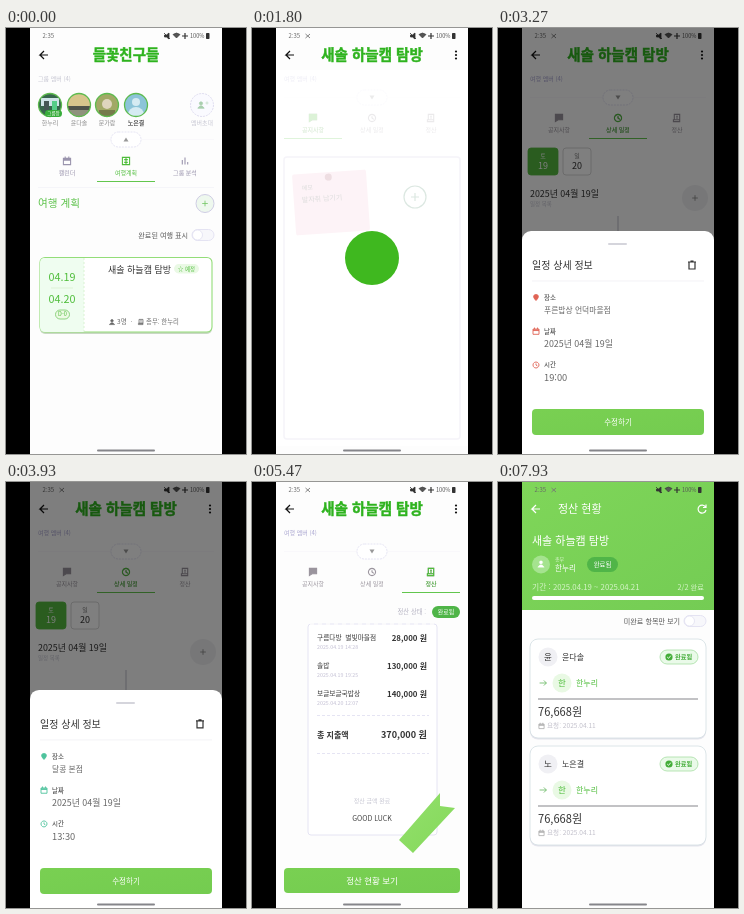
Write an HTML page that moves like this. It is 240x426 px and loops after 8 s.

```html
<!DOCTYPE html>
<html lang="ko">
<head>
<meta charset="utf-8">
<title>여행 앱</title>
<style>
html, body { margin: 0; width: 100%; height: 100%; overflow: hidden; background: #000; }
svg { display: block; width: 100vw; height: 100vh; }
text { font-family: "Noto Sans CJK KR", "Noto Sans CJK", "Noto Sans", sans-serif; white-space: pre; }
.a { animation: 8s linear infinite; }
.trip { animation-name: trip; }
.status { animation-name: status; }
.loading { animation-name: loading; }
.views { animation-name: views; }
.line { animation-name: line; }
.on0 { animation-name: on0; }
.on1 { animation-name: on1; }
.on2 { animation-name: on2; }
.dim { animation-name: dim; }
.dinner { animation-name: dinner; }
.lunch { animation-name: lunch; }
.refresh { animation-name: refresh; transform-origin: 120px 68px; }
.spin { animation: spin .9s linear infinite; transform-origin: 120px 68px; }
@keyframes trip { 0%, 12% { opacity: 0 } 15%, 100% { opacity: 1 } }
@keyframes status {
  0%, 74% { opacity: 0; transform: translateX(24px); animation-timing-function: ease-out }
  77.5%, 100% { opacity: 1; transform: none }
}
@keyframes loading { 0%, 25% { opacity: 1 } 27.5%, 100% { opacity: 0 } }
@keyframes views {
  0%, 30.5% { transform: none; animation-timing-function: ease }
  34%, 59.5% { transform: translateX(-192px); animation-timing-function: ease }
  63%, 100% { transform: translateX(-384px) }
}
@keyframes line {
  0%, 30.5% { transform: none; animation-timing-function: ease }
  34%, 59.5% { transform: translateX(59px); animation-timing-function: ease }
  63%, 100% { transform: translateX(118px) }
}
@keyframes on0 { 0%, 30.5% { opacity: 1 } 34%, 100% { opacity: 0 } }
@keyframes on1 { 0%, 30.5% { opacity: 0 } 34%, 59.5% { opacity: 1 } 63%, 100% { opacity: 0 } }
@keyframes on2 { 0%, 59.5% { opacity: 0 } 63%, 100% { opacity: 1 } }
@keyframes dim {
  0%, 35% { opacity: 0 } 38%, 42% { opacity: .5 }
  44.5%, 46% { opacity: 0 } 48.5%, 53.5% { opacity: .5 } 56%, 100% { opacity: 0 }
}
@keyframes dinner {
  0%, 35% { transform: translateY(226px); animation-timing-function: ease-out }
  38.5%, 42% { transform: none; animation-timing-function: ease-in }
  44.5%, 100% { transform: translateY(226px) }
}
@keyframes lunch {
  0%, 46% { transform: translateY(226px); animation-timing-function: ease-out }
  49.125% { transform: translateY(5px) }
  50%, 53.5% { transform: none; animation-timing-function: ease-in }
  56%, 100% { transform: translateY(226px) }
}
@keyframes refresh {
  0%, 80% { transform: translateY(-80px) } 83%, 88.5% { transform: none }
  90.5%, 100% { transform: scale(0) }
}
@keyframes spin { to { transform: rotate(360deg) } }
</style>
</head>
<body>
<svg id="stage" viewBox="0 0 240 426" preserveAspectRatio="none"></svg>
<script>
const GREEN = '#4fbd3b', TITLE = '#2fb31f', INK = '#333', PALE = '#c6c6d2', EDGE = '#dfddf0';
const TRIP = '새솔 하늘캠 탐방', LEADER = '한누리';
const MEMBERS = [LEADER, '윤다솔', '문가람', '노은결'];

const attrs = o => Object.entries(o).map(([k, v]) => `${k}="${v}"`).join(' ');
const group = (cls, ...kids) => `<g class="a ${cls}">${kids.join('')}</g>`;
const rect = (x, y, w, h, fill, r = 0, more = {}) =>
  `<rect ${attrs({ x, y, width: w, height: h, fill, rx: r, ...more })}/>`;
const box = (x, y, w, h, fill, r, stroke, more = {}) =>
  rect(x, y, w, h, fill, r, { stroke, 'stroke-width': .8, ...more });
const dot = (cx, cy, r, fill, more = {}) => `<circle ${attrs({ cx, cy, r, fill, ...more })}/>`;
const path = (d, stroke, width = 1, more = {}) =>
  `<path ${attrs({ d, stroke, 'stroke-width': width, fill: 'none', ...more })}/>`;
// y is the vertical middle of the line of text
const text = (x, y, size, fill, str, anchor = 'start', weight = 400, more = {}) =>
  `<text ${attrs({ x, y: y + size * .36, fill, 'font-size': size, 'text-anchor': anchor, 'font-weight': weight, ...more })}>${str}</text>`;
const mid = (x, y, size, fill, str, weight) => text(x, y, size, fill, str, 'middle', weight);
const end = (x, y, size, fill, str, weight) => text(x, y, size, fill, str, 'end', weight);
const bold = (x, y, size, fill, str) => text(x, y, size, fill, str, 'start', 700);

const SHAPES = {
  calendar: 'M-4-3H4V4H-4ZM-4-2H4M-4-1H4M-2-5V-3M2-5V-3',
  plan: 'M-4-4H4V4H-4ZM-2-1.5H2M-2 1.5H2M0-4V4',
  bars: 'M-3 4V-1M0 4V-4M3 4V1',
  chat: 'M-4-4H4V2H-1L-4 4Z',
  clock: 'M0-4A4 4 0 1 1-.01-4ZM0-2V0L2 1.5',
  bill: 'M-3-4H3V2H-3ZM-4 2H3V4H-4ZM-1-2H1M-1 0H1',
  pin: 'M0 4C-6-2-2-4 0-4S6-2 0 4ZM0-2V-.5',
  trash: 'M-3-2.5V4H3V-2.5M-4-3H4M-1.5-4H1.5',
  person: 'M0-4A2 2 0 1 1-.01-4ZM-4 4Q0-2 4 4Z',
  plus: 'M-4 0H4M0-4V4',
  back: 'M4 0H-4L0-4M-4 0L0 4',
  next: 'M-4 0H4L1-3M4 0L1 3',
  reload: 'M3.5-2A4 4 0 1 0 4 1M4-4.5V-1.5H1',
  check: 'M-2 0L-.5 1.5L2-1.5'
};
const SOLID = ['chat', 'pin', 'person'];
const icon = (name, x, y, color, scale = 1, width = 1.2) =>
  path(SHAPES[name], color, width, {
    transform: `translate(${x} ${y}) scale(${scale})`, fill: SOLID.includes(name) ? color : 'none'
  });

const page = (bg = '#fdfdfd') => rect(24, 0, 192, 426, bg);
const heading = str => text(120, 27, 14.5, TITLE, str, 'middle', 900, { stroke: TITLE, 'stroke-width': .45 });
const menu = [23.5, 27, 30.5].map(y => dot(204, y, 1.1, '#111')).join('');
const notification = path('M53.5 6L58 10M58 6L53.5 10', '#777', .9);
const toggle = y => box(186, y - 5.5, 22, 11, '#f7f7fb', 5.5, EDGE) +
  dot(191.5, y, 5, '#fff', { stroke: EDGE, 'stroke-width': .7 });
const chevron = (y, sign) => path(`M32 ${y}H208`, '#f6f5fa', .6) +
  box(105, y - 7.5, 30, 15, '#fff', 7.5, EDGE, { 'stroke-dasharray': '2 1' }) +
  path(`M117.5 ${y + 2 * sign}H122.5L120 ${y - 2 * sign}Z`, 'none', 0, { fill: '#999' });
const tab = (x, y, color, shape, label) =>
  icon(shape, x, y, color, .9) + mid(x, y + 12, 6, color, label);

const statusBar = text(36.5, 8, 6, '#666', '2:35') +
  path('M158.5 7h2l2.5-2v6l-2.5-2h-2ZM158 5l6 6', '#333', .8, { fill: '#333' }) +
  path('M167 6.5q3.5-3 7 0L170.5 10Z', '#333', .6, { fill: '#555' }) +
  path('M176 8h6M179 5v6', '#333', 1.2) +
  text(184, 8, 5.6, '#555', '100%') + rect(200, 5, 3.5, 6, '#333', .7);
const navBar = rect(91, 421.5, 58, 2, '#85858a', 1);

function avatar(i, x) {
  const art = [
    rect(-12, -12, 24, 24, '#37664d') + rect(-9, -7, 18, 8, '#cfe3e8') + rect(-6, -4, 5, 9, '#455') + rect(2, -4, 5, 9, '#5c8'),
    rect(-12, -12, 24, 24, '#d8c58c') + rect(-12, 1, 24, 11, '#50534a') + rect(-12, 5, 24, 8, '#8f927d'),
    rect(-12, -12, 24, 24, '#a2a966') + dot(0, -1, 5, '#dfd5bd') + rect(-8, 5, 16, 8, '#767b4c'),
    rect(-12, -12, 24, 24, '#8cc4d8') + dot(0, -3, 4, '#d5ebf2') + dot(0, 10, 8, '#d5ebf2')
  ][i];
  const badge = i ? '' : rect(-5, 5, 17, 7, '#38ad3b', 3.5) + mid(3.5, 8.5, 4.5, '#fff', '그룹장');
  return `<g transform="translate(${x} 77)"><g clip-path="url(#round)">${art}</g>` +
    dot(0, 0, 11.5, 'none', { stroke: '#5dbb4e', 'stroke-width': 1.3 }) + badge + '</g>' +
    mid(x, 94.5, 6, i < 3 ? '#888' : '#555', MEMBERS[i], i < 3 ? 400 : 700);
}

const groupPage = page() + icon('back', 38, 27, '#111') + heading('들꽃친구들') +
  text(32, 51, 6, PALE, '그룹 멤버 (4)') + MEMBERS.map((_, i) => avatar(i, [44, 73, 101, 130][i])).join('') +
  dot(196, 77, 11.5, '#fafaff', { stroke: EDGE, 'stroke-dasharray': '2 1' }) +
  icon('person', 195, 77, '#a9cfae', .8, 1) + icon('plus', 201, 75, '#a9cfae', .4) +
  mid(196, 95, 6, PALE, '멤버초대') + chevron(111.5, 1) +
  tab(61, 133, '#9a94ad', 'calendar', '캘린더') + tab(120, 133, GREEN, 'plan', '여행계획') +
  tab(179, 133, '#9a94ad', 'bars', '그룹 분석') +
  path('M32 159.5H208', '#f0f0f6', .6) + rect(91, 153, 58, 1, '#62c64d') +
  text(32, 175.5, 10.6, '#5cc24a', '여행 계획', 'start', 500) +
  dot(199, 175.5, 9, '#eef8ee', { stroke: '#cfcde4' }) + icon('plus', 199, 175.5, '#79c96b', .7) +
  end(182, 207, 7.1, '#555', '완료된 여행 표시') + toggle(207) +
  rect(34, 231.5, 172, 74.5, '#c9d8c4', 5) + box(34, 229.5, 172, 74.5, '#fff', 5, '#93dd78', { 'stroke-width': 1.1 }) +
  path('M78 230H39q-5 0-5 5V299q0 5 5 5H78Z', 'none', 0, { fill: '#effdf0' }) +
  path('M78 230V304', '#d3efc9', .8, { 'stroke-dasharray': '2 2' }) +
  mid(56, 249.5, 10.8, GREEN, '04.19') + path('M45 260H67', '#d5edc9', .7) +
  mid(56, 271, 10.8, GREEN, '04.20') +
  box(49.5, 282, 14, 9, '#ecfae4', 4.5, '#78ca67') + mid(56.5, 286.5, 5.5, GREEN, 'D-0') +
  text(102, 242, 9, INK, TRIP, 'start', 500) + rect(168, 236, 25, 9.5, '#eaf9e5', 4.7) +
  mid(180.5, 240.8, 5.4, GREEN, '☆ 예정') +
  icon('person', 106, 294, '#666', .65, 1) + text(111, 294, 6.6, '#666', '3명  ·') +
  icon('bill', 135, 294, '#666', .65) + text(140, 294, 6.4, '#666', '총무: ' + LEADER);

const noticeView = box(32, 129, 176, 282, '#fffdfd', 3, '#cbc5de', { 'stroke-width': 1.5 }) +
  `<g transform="rotate(-4 79 174)">${rect(42, 144, 74, 61, '#f3c2d4', 2)}${dot(78, 149, 3.5, '#a85a70')}` +
  text(51, 158, 6, '#555', '메모') + text(50, 170, 7, '#555', '발자취 남기기') + '</g>' +
  dot(163, 169, 11, '#fff', { stroke: '#4f8a6c', 'stroke-width': 1.2 }) + icon('plus', 163, 169, '#4f8a6c');

const chip = (x, w, on, day, date) =>
  box(x, 120, w, 27, on ? '#54b93f' : '#fff', 3, on ? '#54b93f' : '#ccc') +
  mid(x + w / 2, 127.5, 6, on ? '#fff' : '#777', day) + mid(x + w / 2, 138, 9, on ? '#fff' : INK, date);
const scheduleView = chip(30, 30, true, '토', '19') + chip(65, 28, false, '일', '20') +
  text(32, 166, 8.9, INK, '2025년 04월 19일', 'start', 500) + text(32, 176, 5.5, PALE, '일정 목록') +
  dot(197, 170, 13, '#f0f0f2') + icon('plus', 197, 170, '#888', .7) + rect(119, 188, 2, 218, '#dedee4');

const expense = (y, name, price, date) => text(65, y, 6.7, INK, name, 'start', 500) +
  end(175, y, 7.9, INK, price + ' 원', 700) + text(65, y + 9.5, 5.3, '#c4c0d4', date);
const dashes = y => path(`M65 ${y}H177`, EDGE, .8, { 'stroke-dasharray': '3 2' });
const settleView = end(174, 130, 6.3, '#b5b3c2', '정산 상태 :') + rect(180, 124, 28, 12, '#4fb548', 6) +
  mid(194, 130, 6, '#fff', '완료됨', 500) +
  box(56, 142, 129, 211, '#fff', 3, EDGE) + path('M58 142H184', '#fdfdfd', 1.6, { 'stroke-dasharray': '4 4' }) +
  expense(156, '구름다방  별빛마을점', '28,000', '2025.04.19 14:28') +
  expense(184, '솔밥', '130,000', '2025.04.19 19:25') +
  expense(212, '보글보글국밥상', '140,000', '2025.04.20 12:07') + dashes(233.5) +
  bold(65, 253, 8, INK, '총 지출액') + end(175, 253, 9.1, INK, '370,000 원', 700) + dashes(271.5) +
  mid(120, 318.5, 6, PALE, '정산 금액 완료') + mid(120, 336, 7, '#444', 'GOOD LUCK', 500) +
  '<path d="M147 358L188 311V324L203 326L161 371Z" fill="url(#ribbon)"/>' +
  rect(32, 386, 176, 25, 'url(#button)', 4) + mid(120, 398.5, 8.5, '#fff', '정산 현황 보기');

const TABS = [[61, 'chat', '공지사항'], [120, 'clock', '상세 일정'], [179, 'bill', '정산']];
const shift = (n, view) => `<g transform="translate(${n * 192})">${view}</g>`;
const tripPage = page() + notification + icon('back', 38, 27, '#111') + heading(TRIP) + menu +
  text(32, 51, 6, '#a9a5d0', '여행 멤버 (4)') + chevron(69.5, -1) +
  TABS.map(([x, shape, label], i) => tab(x, 90, '#9a949d', shape, label) +
    group('on' + i, tab(x, 90, GREEN, shape, label))).join('') +
  group('line', rect(32, 110, 58, 1, '#62c64d')) +
  group('views', shift(0, noticeView), shift(1, scheduleView), shift(2, settleView)) +
  group('loading', rect(24, 42, 192, 376, '#fff', 0, { opacity: .8 }), dot(120, 230, 27, '#3fb81f'));

function sheet(cls, color, place, time) {
  const row = (y, shape, label, value, size) => icon(shape, 38, y, color, .75) +
    text(46, y, 6.5, INK, label, 'start', 500) + text(46, y + 12.7, size, '#666', value);
  return group(cls, rect(24, 203, 192, 240, '#fff', 9), rect(110, 215, 19, 2, '#d5d5dc', 1),
    text(34, 237, 10, INK, '일정 상세 정보', 'start', 500), icon('trash', 194, 237, INK),
    path('M34 253H206', '#eeedf3', .7),
    row(269.5, 'pin', '장소', place, 7.8), row(303.3, 'calendar', '날짜', '2025년 04월 19일', 8.9),
    row(337, 'clock', '시간', time, 9.3),
    rect(34, 381, 172, 26, 'url(#button)', 4), mid(120, 394, 7.5, '#fff', '수정하기'));
}

function transfer(y, from) {
  return `<g transform="translate(0 ${y})">` + rect(32, 1.5, 176, 99, '#e4e3ec', 8) +
    box(32, 0, 176, 99, '#fff', 8, '#d3dfe3') +
    dot(50, 18, 9.5, '#f0f0f4') + mid(50, 18, 8.5, INK, from[0], 500) + text(64, 18, 8, INK, from, 'start', 500) +
    box(162, 11, 38, 14, '#eafae9', 7, '#a8dfa4') + dot(171, 18, 3.6, '#43ad38') + icon('check', 171, 18, '#fff', .9, 1) +
    bold(177, 18, 6.2, '#43ad38', '완료됨') +
    icon('next', 45, 44, '#6cba66', .85, 1) + dot(64, 44, 9.5, '#e9f9e4') +
    mid(64, 44, 8.5, GREEN, LEADER[0]) + text(78, 44, 8, GREEN, LEADER) +
    path('M40 60H200', '#85858a', 1) + text(40, 73.5, 11.1, INK, '76,668원', 'start', 500) +
    icon('calendar', 43.5, 87, '#aaa', .65) + text(49, 87, 6.6, '#c0bfca', '요청: 2025.04.11') + '</g>';
}

const statusPage = page() + rect(24, 0, 192, 128, 'url(#header)') + notification +
  icon('back', 38, 27, '#fff') + text(60, 27, 11, '#fff', '정산 현황', 'start', 500) + icon('reload', 204, 27, '#fff') +
  text(34, 59, 11, '#fff', TRIP) + dot(43, 82.5, 9, '#a5e38f') + icon('person', 43, 82, '#fff', .8, .5) +
  text(57, 77, 5, '#d8f5cc', '총무') + text(57, 86.5, 7.6, '#fff', LEADER) +
  rect(89, 75, 31, 15, '#50b548', 7.5) + mid(104.5, 82.5, 6.4, '#fff', '완료됨', 500) +
  text(34, 105, 7.8, '#d6f4c9', '기간 : 2025.04.19 ~ 2025.04.21') + end(206, 105, 7.3, '#d6f4c9', '2/2 완료') +
  rect(34, 114, 172, 4, '#fff', 2) +
  end(182, 139, 7.1, '#555', '미완료 항목만 보기') + toggle(139) +
  transfer(157, MEMBERS[1]) + transfer(264, MEMBERS[3]) +
  group('refresh', dot(120, 69, 10.5, '#5eae49', { opacity: .4 }), dot(120, 68, 10, '#fff'),
    '<g class="spin">' + path('M124.6 64.4A5.8 5.8 0 1 0 125.8 68', '#6abe59', 1.6) + '</g>');

const gradient = (id, from, to) =>
  `<linearGradient id="${id}" x2="1" y2="1"><stop stop-color="${from}"/><stop offset="1" stop-color="${to}"/></linearGradient>`;

document.getElementById('stage').innerHTML =
  `<defs><clipPath id="screen">${rect(24, 0, 192, 426, '#fff')}</clipPath><clipPath id="round">${dot(0, 0, 11.5)}</clipPath>` +
  gradient('button', '#79d052', '#74cc50') + gradient('ribbon', '#93e06c', '#84d85a') +
  gradient('header', '#7fd659', '#74cc54') + '</defs>' + rect(0, 0, 240, 426, '#000') +
  '<g clip-path="url(#screen)">' + groupPage + group('trip', tripPage) + group('status', statusPage) +
  statusBar + group('dim', rect(24, 0, 192, 426, '#000')) +
  sheet('dinner', '#e06455', '푸른밥상 언덕마을점', '19:00') + sheet('lunch', '#4ec39d', '달콩 본점', '13:30') +
  navBar + '</g>';
</script>
</body>
</html>
```
